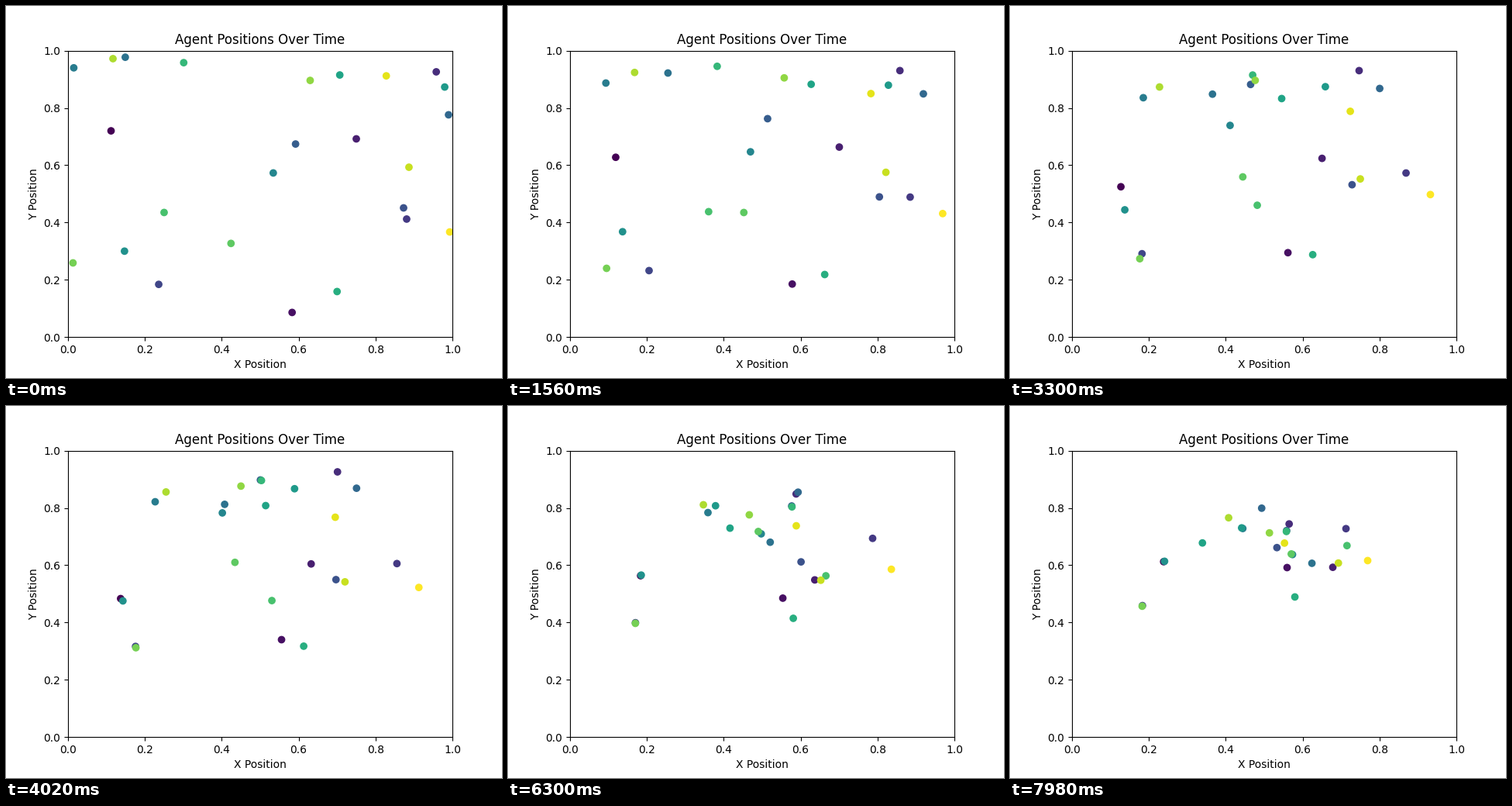
A matplotlib script for the animation above (8 s loop, 640x480 px).

```python
import numpy as np
import matplotlib.pyplot as plt
from matplotlib.animation import FuncAnimation

TICK = 20        # ms per drawn frame
HOLD = 3         # frames each simulation step stays on screen
FRAMES = 400

# Start x, start y (1/1000), speed per step (1/100000), agent being chased.
AGENTS = np.array([
    (112, 720, 356, 12), (583, 86, 382, 7), (750, 692, 220, 17),
    (958, 926, 384, 16), (881, 412, 296, 3), (236, 184, 219, 12),
    (873, 451, 301, 10), (592, 674, 454, 16), (990, 776, 416, 13),
    (149, 977, 459, 2), (15, 940, 364, 11), (534, 573, 377, 9),
    (147, 300, 264, 10), (980, 873, 584, 10), (707, 915, 331, 0),
    (700, 159, 270, 9), (301, 958, 319, 23), (250, 435, 426, 4),
    (424, 327, 431, 11), (13, 259, 325, 5), (630, 896, 282, 9),
    (117, 972, 270, 11), (887, 593, 260, 17), (828, 912, 295, 18),
    (993, 367, 263, 23),
])


def pursue(pos, speed, target):
    """Move every agent straight towards its target, never past it."""
    gap = pos[target] - pos
    dist = np.linalg.norm(gap, axis=1, keepdims=True)
    return pos + gap * np.minimum(1, speed / np.maximum(dist, 1e-9))


path = [AGENTS[:, :2] / 1e3]
for _ in range(FRAMES // HOLD):
    path.append(pursue(path[-1], AGENTS[:, 2:3] / 1e5, AGENTS[:, 3]))

fig, ax = plt.subplots(figsize=(6.4, 4.8), dpi=100)
dots = ax.scatter(*path[0].T, c=np.arange(len(AGENTS)), cmap="viridis")
ax.set(xlim=(0, 1), ylim=(0, 1), xlabel="X Position", ylabel="Y Position",
       title="Agent Positions Over Time")


def update(frame):
    dots.set_offsets(path[frame // HOLD])
    return (dots,)


anim = FuncAnimation(fig, update, frames=FRAMES, interval=TICK,
                     init_func=lambda: update(0), repeat=True, repeat_delay=0)
plt.show()
```
